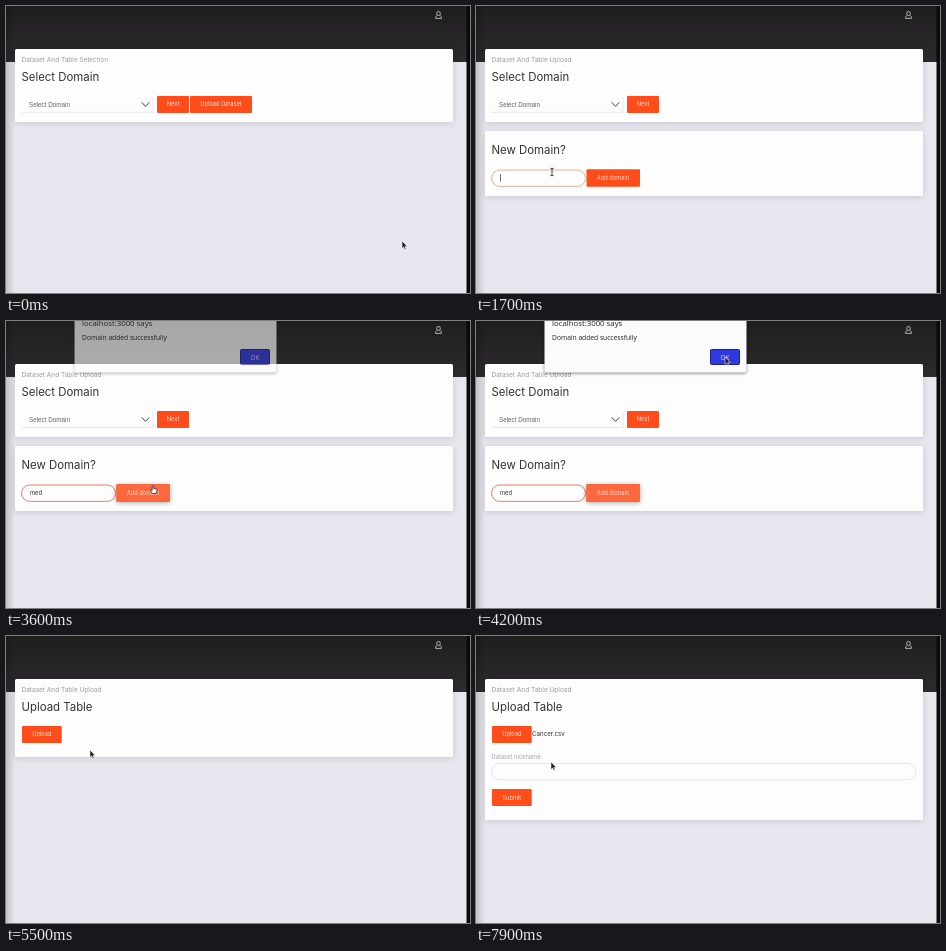
An HTML page for the animation above (8000 ms loop, 464x287 px).

```html
<!DOCTYPE html>
<html lang="en">
<head>
<meta charset="utf-8">
<title>Dataset upload</title>
<style>
html, body { margin: 0; width: 100%; height: 100%; overflow: hidden; background: #e8e6ee; }
svg { display: block; width: 100vw; height: 100vh; }
text { font-family: Inter, sans-serif; fill: #333; }
.title { font-size: 11.4px; }
.sub { font-size: 6.5px; fill: #9b9a9d; }
.small { font-size: 5.8px; }
.btn rect { fill: #ff4c1b; }
.btn text { font-size: 5.7px; fill: #ffe0d6; text-anchor: middle; }
.card { fill: #fefdfe; filter: drop-shadow(0 1px 3px #0002); }
.field { fill: #fefdfe; stroke: #e2e0e4; stroke-width: .8; }
.dialog text { font-family: "Open Sans", "Noto Sans", sans-serif; fill: #222; }

/* 1.25% is 100 ms */
.timed { animation: 8s step-end infinite; }
.choose { animation-name: choose; }
.domain { animation-name: domain; }
.select { animation-name: select; }
.later { animation-name: later; }
.table { animation-name: table; }
.short { animation-name: short; }
.chosen { animation-name: chosen; }
.focus { animation-name: focus; }
.hover { animation-name: hover; }
.dialog { animation-name: dialog; }
.caret { animation-name: caret; }
.k1 { animation-name: k1; }
.k2 { animation-name: k2; }
.k3 { animation-name: k3; }
.arrow { animation-name: arrow; }
.beam { animation-name: beam; }
.hand { animation-name: hand; }
@keyframes choose { 0% { opacity: 1 } 11.25%, 100% { opacity: 0 } }
@keyframes domain { 0%, 56.25%, 100% { opacity: 0 } 11.25% { opacity: 1 } }
@keyframes select { 0% { opacity: 1 } 56.25%, 100% { opacity: 0 } }
@keyframes later { 0% { opacity: 0 } 11.25%, 100% { opacity: 1 } }
@keyframes table { 0% { opacity: 0 } 56.25%, 100% { opacity: 1 } }
@keyframes short { 0%, 93.75%, 100% { opacity: 0 } 56.25% { opacity: 1 } }
@keyframes chosen { 0% { opacity: 0 } 93.75%, 100% { opacity: 1 } }
@keyframes focus { 0% { opacity: 0 } 18.75% { opacity: .3 } 20% { opacity: .5 } 22.5% { opacity: .9 } 100% { opacity: .9 } }
@keyframes hover { 0%, 56.25%, 100% { opacity: 0 } 35% { opacity: .5 } 36.25% { opacity: 1 } }
@keyframes dialog { 0%, 57.5%, 100% { opacity: 0 } 45%, 56.25% { opacity: .62 } 46.25% { opacity: 1 } }
@keyframes caret {
  0%, 32.5%, 100% { opacity: 0 }
  18.75% { opacity: 1; transform: none }
  26.25% { opacity: 1; transform: translateX(5.2px) }
  27.5% { opacity: 1; transform: translateX(8.6px) }
  30% { opacity: 1; transform: translateX(12.2px) }
}
@keyframes k1 { 0%, 56.25%, 100% { visibility: hidden } 26.25% { visibility: visible } }
@keyframes k2 { 0%, 56.25%, 100% { visibility: hidden } 27.5% { visibility: visible } }
@keyframes k3 { 0%, 56.25%, 100% { visibility: hidden } 30% { visibility: visible } }
@keyframes arrow {
  0%, 11.25%, 46.25%, 67.5%, 100% { opacity: 1 }
  7.5%, 16.25%, 63.75% { opacity: 0 }
}
@keyframes beam { 0%, 35%, 100% { opacity: 0 } 16.25% { opacity: 1 } }
@keyframes hand {
  0%, 11.25%, 46.25%, 67.5%, 100% { opacity: 0 }
  7.5%, 35%, 63.75% { opacity: 1 }
}

/* the pointer moves in 100 ms steps, as in a 10 fps screen capture */
.pointer { animation: pointer 8s step-end infinite; }
@keyframes pointer {
  0% { transform: translate(396px, 235px) }
  1.25% { transform: translate(396px, 235px); animation-timing-function: steps(6) }
  8.75% { transform: translate(213px, 100px); animation-timing-function: steps(3) }
  12.5% { transform: translate(199px, 98px); animation-timing-function: steps(4) }
  17.5% { transform: translate(76px, 166px) }
  23.75% { transform: translate(76px, 166px); animation-timing-function: steps(3) }
  27.5% { transform: translate(109px, 170px) }
  28.75% { transform: translate(109px, 170px); animation-timing-function: steps(2) }
  31.25% { transform: translate(109px, 168px) }
  32.5% { transform: translate(109px, 168px); animation-timing-function: steps(5) }
  38.75% { transform: translate(147px, 165px) }
  45% { transform: translate(147px, 165px); animation-timing-function: steps(6) }
  52.5% { transform: translate(249px, 36px) }
  56.25% { transform: translate(227px, 62px); animation-timing-function: steps(7) }
  65% { transform: translate(51px, 102px) }
  66.25% { transform: translate(51px, 102px); animation-timing-function: steps(2) }
  68.75% { transform: translate(84px, 114px); animation-timing-function: steps(4) }
  73.75% { transform: translate(95px, 241px) }
  75% { transform: translate(95px, 241px); animation-timing-function: steps(3) }
  78.75% { transform: translate(91px, 261px) }
  86.25% { transform: translate(92px, 261px) }
  90%, 92.5% { transform: translate(93px, 261px); animation-timing-function: steps(1) }
  93.75% { transform: translate(91px, 240px); animation-timing-function: steps(4) }
  98.75%, 100% { transform: translate(75px, 126px) }
}
</style>
</head>
<body>
<svg viewBox="0 0 464 287" preserveAspectRatio="none">
  <defs>
    <linearGradient id="header" x2="0" y2="1">
      <stop stop-color="#1f1e1f"/><stop offset="1" stop-color="#2d2b2d"/>
    </linearGradient>
    <linearGradient id="edge">
      <stop stop-color="#000" stop-opacity=".16"/><stop offset="1" stop-color="#000" stop-opacity="0"/>
    </linearGradient>
  </defs>

  <rect width="464" height="287" fill="#e8e6ee"/>
  <rect width="461" height="56" fill="url(#header)"/>
  <rect width="9" height="287" fill="url(#edge)"/>
  <rect x="460.5" width="3.5" height="287" fill="#0b0a0b"/>
  <g fill="none" stroke="#d4d2d4" stroke-width=".8">
    <ellipse cx="432.5" cy="7.5" rx="1.8" ry="2.1"/>
    <path d="M430.8 9.4Q429.6 10 429.6 12.4H435.4Q435.4 10 434.2 9.4"/>
  </g>

  <g class="timed select">
    <rect class="card" x="9" y="43" width="438" height="73" rx="1.5"/>
    <text class="title" x="15.5" y="74.6">Select Domain</text>
    <path d="M16 106.3H147V91" fill="none" stroke="#e4e2e6" stroke-width=".8"/>
    <text x="23" y="100.7" style="font: 6.3px 'Liberation Sans', sans-serif; fill: #666">Select Domain</text>
    <path d="M135.7 96.3L139.5 100.4L143.3 96.3" fill="none" stroke="#444" stroke-width="1"/>
    <g class="btn"><rect x="151" y="90" width="32" height="17" rx="1"/><text x="167" y="100.4">Next</text></g>
  </g>

  <g class="timed choose">
    <text class="sub" x="15.5" y="56">Dataset And Table Selection</text>
    <g class="btn"><rect x="184" y="90" width="62" height="17" rx="1"/><text x="215" y="100.4">Upload Dataset</text></g>
  </g>

  <g class="timed domain">
    <rect class="card" x="9" y="125" width="438" height="65" rx="1.5"/>
    <text class="title" x="15.5" y="148.2">New Domain?</text>
    <rect class="field" x="15.5" y="164" width="94" height="16.4" rx="8.2"/>
    <rect class="timed focus" x="15.5" y="164" width="94" height="16.4" rx="8.2" fill="none" stroke="#f0703f" stroke-width=".9"/>
    <text class="small" x="24" y="174.2"><tspan class="timed k1">m</tspan><tspan class="timed k2">e</tspan><tspan class="timed k3">d</tspan></text>
    <path class="timed caret" d="M24.6 168.3V175.6" stroke="#333" stroke-width=".8"/>
    <g class="btn">
      <rect x="110.5" y="163.3" width="53.5" height="17.4" rx="1"/>
      <rect class="timed hover" x="110.5" y="163.3" width="53.5" height="17.4" rx="1" style="fill: #ff683e; filter: drop-shadow(0 1.5px 2.5px #0005)"/>
      <text x="137" y="174">Add domain</text>
    </g>
  </g>

  <g class="timed table">
    <rect class="timed short card" x="9" y="43" width="438" height="78" rx="1.5"/>
    <rect class="timed chosen card" x="9" y="43" width="438" height="141" rx="1.5"/>
    <text class="title" x="15.5" y="74.6">Upload Table</text>
    <g class="btn"><rect x="16" y="90" width="39.7" height="17" rx="1"/><text x="35.8" y="100.4">Upload</text></g>
  </g>

  <g class="timed chosen">
    <text x="56" y="100.4" font-size="6.2">Cancer.csv</text>
    <text class="small" x="15.5" y="123.3" style="fill: #a5a3a7">Dataset nickname:</text>
    <rect class="field" x="15.5" y="127.4" width="424.5" height="16.4" rx="8.2"/>
    <g class="btn"><rect x="16" y="153" width="39.7" height="17" rx="1"/><text x="35.8" y="163.6">Submit</text></g>
  </g>

  <text class="timed later sub" x="15.5" y="56">Dataset And Table Upload</text>

  <g class="timed dialog">
    <rect x="68.5" y="-5" width="202" height="56.5" rx="2" fill="#fcfbfc" style="filter: drop-shadow(0 1px 1.5px #0007)"/>
    <text x="76" y="5" font-size="7.8">localhost:3000 says</text>
    <text x="76" y="18.8" font-size="6.7">Domain added successfully</text>
    <rect x="234.5" y="28.5" width="29" height="15" rx="1" fill="#3038e0" stroke="#20208c"/>
    <text x="249" y="38.6" font-size="6.5" text-anchor="middle" style="fill: #dcdcf4">OK</text>
  </g>

  <g class="pointer">
    <path class="timed arrow" d="M0 0V7.4L1.7 5.9L2.9 8.6L4.1 8.1L2.9 5.4H5.2Z" fill="#1c1b1c" stroke="#fff" stroke-width=".5"/>
    <path class="timed beam" d="M-1.6 -3.6H1.6M0 -3.6V3.6M-1.6 3.6H1.6" fill="none" stroke="#333" stroke-width=".9"/>
    <path class="timed hand" d="M-.8 .2Q0 -1.2 .8 .2V2.4L3.6 3Q4.2 3.2 4 4.4L3.2 7.4H-.8L-2.8 4.4Q-2.4 3.2 -.8 4.4Z" fill="#fff" stroke="#222" stroke-width=".8"/>
  </g>
</svg>
</body>
</html>
```
